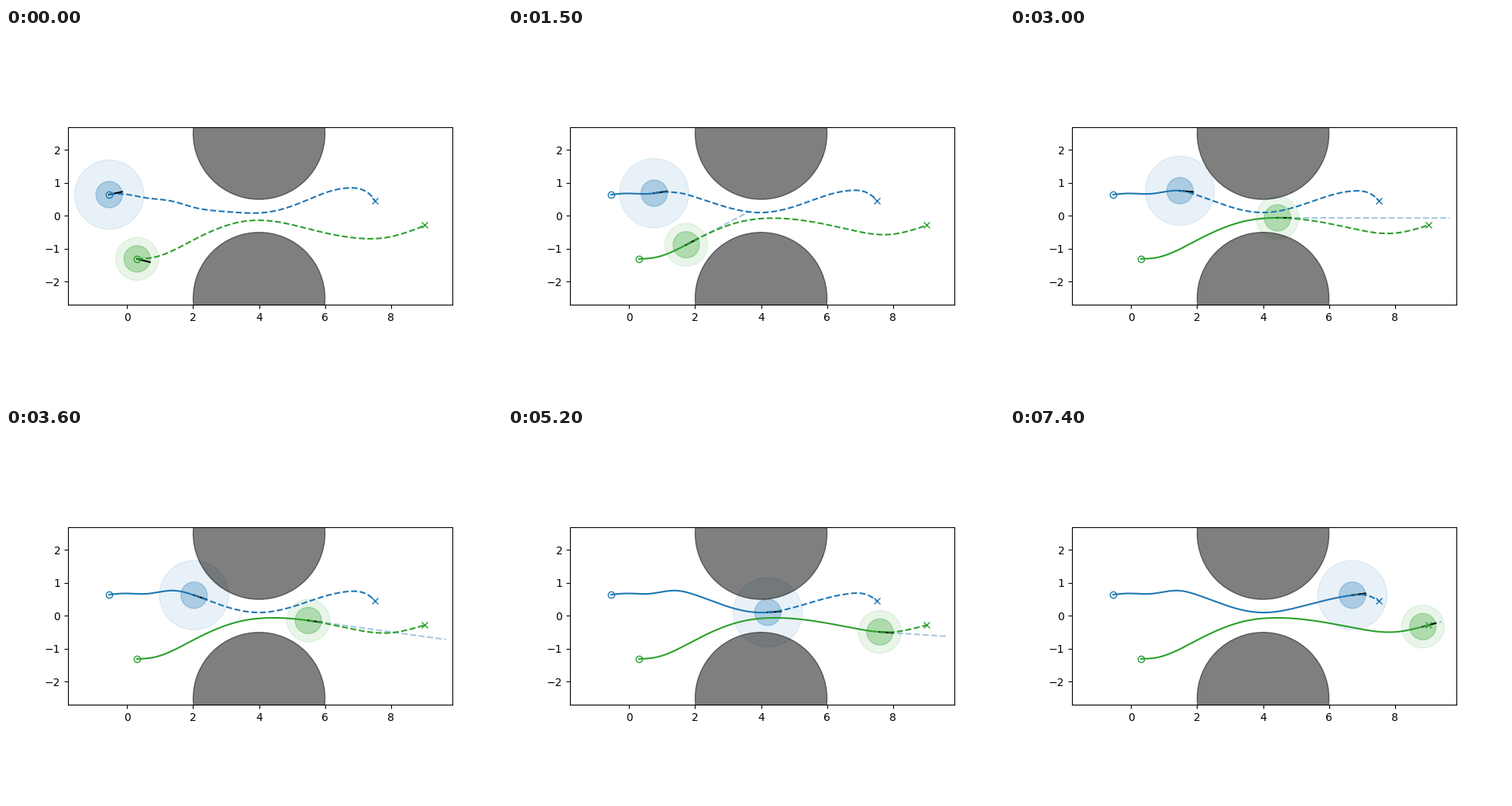
Write a matplotlib script that moves like this. It is 640 px wide and 480 px high and loops after 7500 ms.

```python
import numpy as np
import matplotlib.pyplot as plt
from matplotlib.animation import FuncAnimation
from matplotlib.patches import Circle

FRAMES, STEP = 75, 100
BODY, HORIZON, BORDER = 0.4, 3.0, 0.2
OBSTACLES = [(4, 2.5), (4, -2.5)]
OBSTACLE_R = 2.0
WAIT = (1.6, 2.6)  # blue has no feasible plan in this time span


def spline(points):
    """Natural cubic spline y(x)."""
    xs, ys = np.array(points, float).T
    h, n = np.diff(xs), len(xs)
    a, b = np.eye(n), np.zeros(n)
    for i in range(1, n - 1):
        a[i, i - 1:i + 2] = h[i - 1], 2 * (h[i - 1] + h[i]), h[i]
        b[i] = 6 * ((ys[i + 1] - ys[i]) / h[i] - (ys[i] - ys[i - 1]) / h[i - 1])
    m = np.linalg.solve(a, b)

    def f(x):
        i = np.clip(np.searchsorted(xs, x) - 1, 0, n - 2)
        p, q, d = xs[i + 1] - x, x - xs[i], h[i]
        return ((m[i] * p**3 + m[i + 1] * q**3) / (6 * d)
                + (ys[i] / d - m[i] * d / 6) * p
                + (ys[i + 1] / d - m[i + 1] * d / 6) * q)
    return f


class Robot:
    def __init__(self, ax, color, margin, path, speeds, lead, bumps):
        self.path, self.lead, self.bumps = spline(path), lead, bumps
        self.start, self.goal = path[0], path[-1]
        self.clock = np.linspace(0, 7.5, 751)
        self.vx = np.interp(self.clock, *zip(*speeds))
        gain = (self.vx[1:] + self.vx[:-1]) / 2 * np.diff(self.clock)
        self.x = self.start[0] + np.append(0, np.cumsum(gain))
        self.discs = [ax.add_patch(Circle(self.start, r, color=color, alpha=a))
                      for r, a in ((margin, 0.1), (BODY, 0.3))]
        self.trail, = ax.plot([], [], color=color)
        self.nose, = ax.plot([], [], color="black")
        self.plan, = ax.plot([], [], "--", color=color, zorder=2.2)
        ax.plot(*self.start, "o", color=color, mfc="none")
        ax.plot(*self.goal, "x", color=color)

    def x_at(self, t):
        return np.interp(t, self.clock, self.x)

    def slope(self, x):
        return (self.path(x + 0.01) - self.path(x - 0.01)) / 0.02

    def planned(self, x, t):
        """Driven path plus bumps that fade with time and at both ends."""
        ramp = np.clip((x - x[0]) / 0.7, 0, 1)
        fade = ramp**2 * (3 - 2 * ramp) * (1 - np.exp((x - self.goal[0]) / 0.08))
        shift = sum(size(t) * np.exp(-((x - c) / w)**2) for c, w, size in self.bumps)
        return self.path(x) + fade * shift

    def move(self, t, waiting=False):
        x = self.x_at(t)
        slope = self.slope(self.x_at(WAIT[0]) if waiting else x)
        angle = np.arctan(slope) + np.radians(self.lead) * max(0, 1 - t / 0.4)
        self.pos = np.array([x, self.path(x)])
        self.dir = np.array([np.cos(angle), np.sin(angle)])
        self.speed = np.interp(t, self.clock, self.vx) * np.hypot(1, slope)
        for disc in self.discs:
            disc.center = self.pos
        self.nose.set_data(*zip(self.pos, self.pos + BODY * self.dir))
        xs = np.linspace(self.start[0], x, 200)
        self.trail.set_data(xs, self.path(xs))
        xs = np.linspace(x, self.goal[0], 200)
        self.plan.set_data(xs, self.planned(xs, t))
        self.plan.set_visible(not waiting)


def free_length(pos, d, speed):
    """Distance a straight prediction runs before the border or an obstacle."""
    length = min(speed * HORIZON, (x_max - BORDER - pos[0]) / d[0])
    for c in OBSTACLES:
        r = np.subtract(c, pos)
        along = r @ d
        gap = (OBSTACLE_R + BODY)**2 - (r @ r - along**2)
        if gap > 0 and along > 0:
            length = min(length, max(along - np.sqrt(gap), 0))
    return length


fig, ax = plt.subplots(figsize=(6.4, 4.8), dpi=100)
ax.set_aspect("equal")
guess, = ax.plot([], [], "--", color="tab:blue", alpha=0.4)

blue = Robot(
    ax, "tab:blue", 1.05,
    path=[(-.547, .645), (-.1, .68), (.6, .67), (1.4, .767), (2.03, .627), (3.06, .26),
          (4, .1), (5.3, .322), (6.7, .627), (7.2, .61), (7.515, .455)],
    speeds=[(0, 0), (.8, 1.19), (1.4, 1.19), (2.55, .03), (3.6, 1.27),
            (5.2, 1.45), (6, 1.35), (7.4, .63)],
    lead=6,
    bumps=[(1.85, 1.2, lambda t: -.38 * np.exp(-t / .86)),
           (6.45, 1.2, lambda t: .08 * np.exp(-t / .4) + .15 * max(0, 1 - (t / 6)**3))])

green = Robot(
    ax, "tab:green", 0.65,
    path=[(.3, -1.305), (.75, -1.27), (2, -.735), (3.33, -.188), (4.4, -.06),
          (6.68, -.348), (8, -.489), (9.015, -.28)],
    speeds=[(0, 0), (.8, 1.14), (1.75, 1.82), (3.2, 1.82), (6, .65), (7.4, .19)],
    lead=-16,
    bumps=[(6, 1.6, lambda t: -.27 * np.exp(-t / .65)),
           (7.5, 1.3, lambda t: -.1 * max(0, 1 - t / 5))])

for c in OBSTACLES:
    ax.add_patch(Circle(c, OBSTACLE_R, color="black", alpha=0.5))
x_max = green.goal[0] + 0.65 + BORDER
ax.set_xlim(blue.start[0] - 1.05 - BORDER, x_max)
ax.set_ylim(-2.5 - BORDER, 2.5 + BORDER)


def draw(i):
    t = i * STEP / 1000
    waiting = WAIT[0] <= t < WAIT[1]
    blue.move(t, waiting)
    green.move(t)
    end = green.pos + green.dir * free_length(green.pos, green.dir, green.speed)
    guess.set_data(*zip(green.pos, end))
    guess.set_visible(not waiting)


anim = FuncAnimation(fig, draw, frames=FRAMES, interval=STEP, repeat=True,
                     repeat_delay=0, init_func=lambda: draw(0))
plt.show()
```
